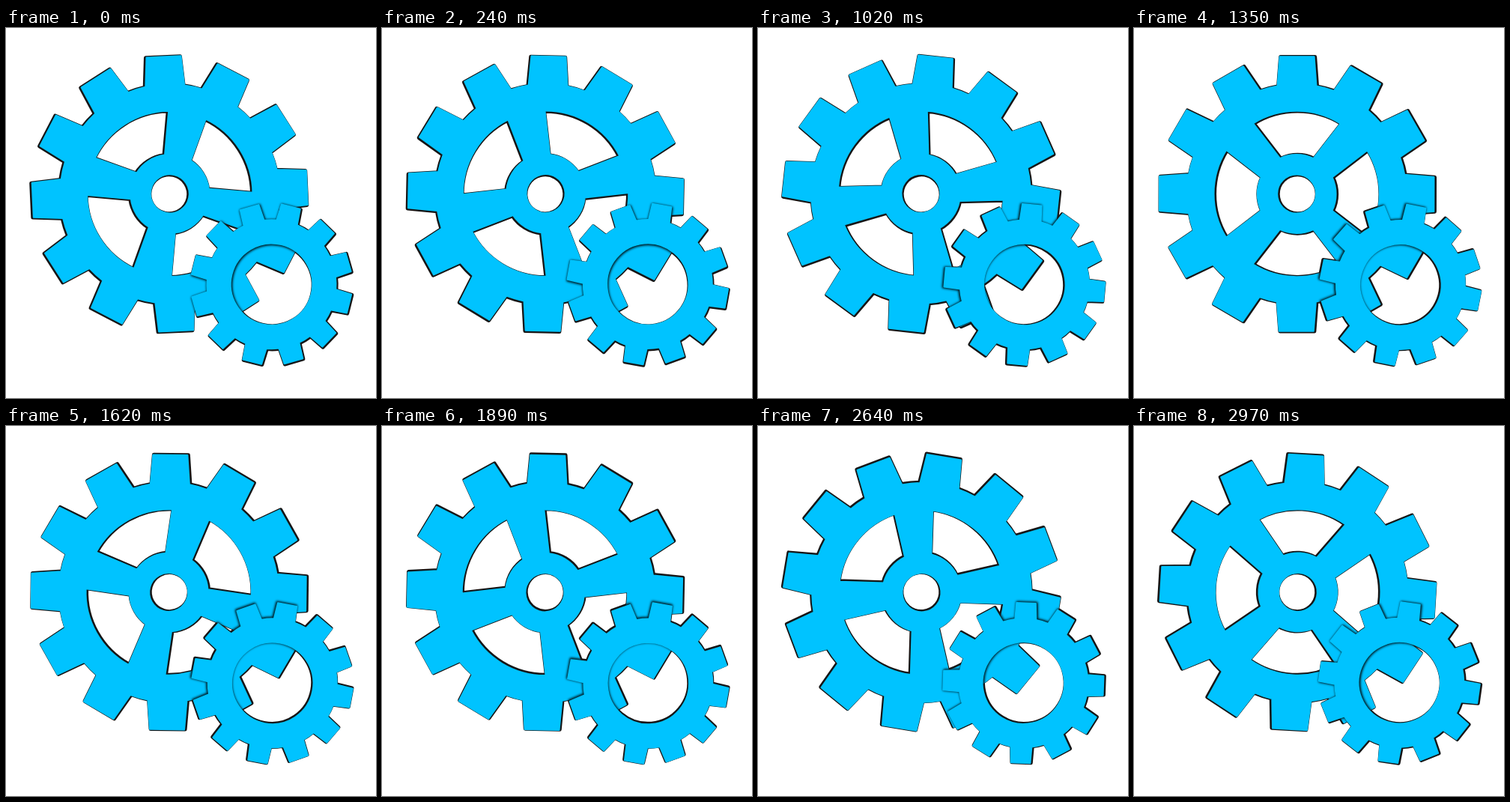
An HTML page with a canvas for the animation above (3 s loop, 494 by 494 pixels).

```html
<!DOCTYPE html>
<html lang="en">
<head>
<meta charset="utf-8">
<title>Gears</title>
<style>
  html, body { margin: 0; width: 100%; height: 100%; overflow: hidden; background: #fff; }
  canvas { display: block; width: 494px; height: 494px; }
</style>
</head>
<body>
<canvas id="stage" width="494" height="494"></canvas>
<script>
const ctx = document.getElementById('stage').getContext('2d');
const LOOP = 3000, TICK = 30;
const STEP = 360 / 110;
const BLUE = '#00c3ff', DARK = '#161616';
const TEETH = 12;
const rad = deg => deg * Math.PI / 180;

// Angles run clockwise from straight up.
const polar = (r, deg) => [r * Math.sin(rad(deg)), -r * Math.cos(rad(deg))];
const arc = (p, r, from, to) =>
  p.arc(0, 0, r, rad(from - 90), rad(to - 90), to < from);

function ring(p, r) {
  p.moveTo(r, 0);
  p.arc(0, 0, r, 0, Math.PI * 2);
  p.closePath();
}

function toothed(tip, tipHalf, root, rootHalf) {
  const p = new Path2D();
  const tipDeg = Math.atan2(tipHalf, tip) * 180 / Math.PI;
  const tipR = Math.hypot(tip, tipHalf);
  const rootDeg = Math.asin(rootHalf / root) * 180 / Math.PI;
  const pitch = 360 / TEETH;
  for (let i = 0; i < TEETH; i++) {
    const a = i * pitch;
    p[i ? 'lineTo' : 'moveTo'](...polar(root, a - rootDeg));
    p.lineTo(...polar(tipR, a - tipDeg));
    p.lineTo(...polar(tipR, a + tipDeg));
    p.lineTo(...polar(root, a + rootDeg));
    arc(p, root, a + rootDeg, a + pitch - rootDeg);
  }
  p.closePath();
  return p;
}

function bigShape() {
  const p = toothed(183.2, 23, 146.3, 26);
  for (let a = 0; a < 360; a += 90) {
    p.moveTo(...polar(110.7, a - 31.8));
    arc(p, 110.7, a - 31.8, a + 31.8);
    p.lineTo(...polar(52.4, a + 25.2));
    arc(p, 52.4, a + 25.2, a - 25.2);
    p.closePath();
  }
  ring(p, 26);
  return p;
}

function smallShape() {
  const p = toothed(106.7, 12.8, 86, 14);
  ring(p, 54.7);
  return p;
}

// face and shade are offsets that turn along with the gear
const big = { shape: bigShape(), x: 218, y: 221.7, start: -32.6, dir: -1,
              face: [0.8, -0.3], shade: [-0.25, 0.1] };
const small = { shape: smallShape(), x: 355.1, y: 342.8, start: 14, dir: 1,
                face: [-0.6, -0.6], shade: [0.2, 0.2] };

function paint(gear, turn, offset, color, width) {
  ctx.save();
  ctx.translate(gear.x, gear.y);
  ctx.rotate(rad(gear.dir * turn));
  ctx.translate(...offset);
  ctx.rotate(rad(gear.start));
  ctx.fillStyle = ctx.strokeStyle = color;
  ctx.lineWidth = width;
  ctx.lineJoin = 'round';
  ctx.fill(gear.shape, 'evenodd');
  ctx.stroke(gear.shape);
  ctx.restore();
}

function draw(turn) {
  ctx.globalCompositeOperation = 'source-over';
  ctx.clearRect(0, 0, 494, 494);
  paint(big, turn, big.face, BLUE, 2);

  // The soft shadow falls only on the big gear.
  ctx.globalCompositeOperation = 'source-atop';
  ctx.filter = 'blur(1.5px)';
  ctx.globalAlpha = 0.75;
  paint(small, turn, small.shade, '#000', 4);
  ctx.filter = 'none';
  ctx.globalAlpha = 1;

  ctx.globalCompositeOperation = 'source-over';
  paint(small, turn, small.face, BLUE, 2);

  // Hard dark edges go behind everything.
  ctx.globalCompositeOperation = 'destination-over';
  paint(big, turn, big.shade, DARK, 5);
  paint(small, turn, small.shade, DARK, 4.8);
}

const origin = performance.now();
function tick() {
  const t = (performance.now() - origin) % LOOP;
  draw(Math.floor(t / TICK) * STEP);
  requestAnimationFrame(tick);
}
tick();
</script>
</body>
</html>
```
